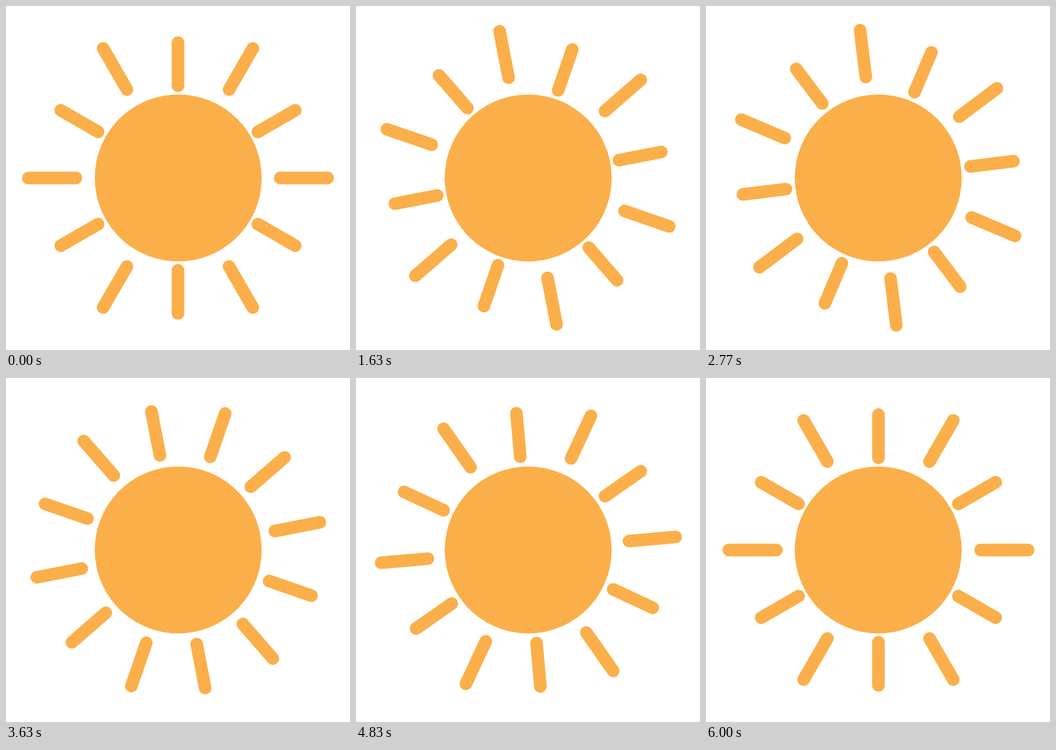
Write an HTML page that moves like this. It is 748 px wide and 748 px high and loops after 6030 ms.

```html
<!DOCTYPE html>
<html lang="en">
<head>
<meta charset="utf-8">
<title>Sun</title>
<style>
  html, body { margin: 0; width: 100%; height: 100%; overflow: hidden; background: #fff; }
  svg { display: block; width: 100vw; height: 100vh; }
</style>
</head>
<body>
<svg viewBox="0 0 748 748">
  <circle cx="374.5" cy="373.9" r="181.5" fill="#fbaf4a"/>
  <g id="rays" stroke="#fbaf4a" stroke-width="27.4" stroke-linecap="round"></g>
</svg>
<script>
  const LOOP = 6030;
  const FPS = 30;
  const LAST = 180;
  const HALF_PULSE = 45;
  const INNER = { mid: 211.45, swing: 10.75 };
  const OUTER = { mid: 309.8, swing: 15.5 };

  const group = document.getElementById('rays');
  const rays = Array.from({ length: 12 }, (_, i) => {
    const line = document.createElementNS('http://www.w3.org/2000/svg', 'line');
    line.setAttribute('transform', `rotate(${i * 30})`);
    return group.appendChild(line);
  });

  // Eased swing between 1 and -1, one way per HALF_PULSE steps
  function pulse(step) {
    const p = (step % HALF_PULSE) / HALF_PULSE;
    const value = 1 - 2 * p * p * (3 - 2 * p);
    return Math.floor(step / HALF_PULSE) % 2 ? -value : value;
  }

  function stepAt(ms) {
    const tick = Math.floor((ms % LOOP) / 10) * 10;
    return Math.min(LAST, Math.floor((tick + 4) * FPS / 1000));
  }

  function draw(step) {
    const swing = pulse(step);
    // One degree per step, around a point half a pixel off the rays' centre
    group.setAttribute('transform', `translate(374.5 374) rotate(${step}) translate(-0.5 0)`);
    rays.forEach((ray, i) => {
      const s = i % 2 ? swing : -swing;
      ray.setAttribute('y1', -(INNER.mid + INNER.swing * s));
      ray.setAttribute('y2', -(OUTER.mid + OUTER.swing * s));
    });
  }

  function frame() {
    draw(stepAt(performance.now()));
    requestAnimationFrame(frame);
  }
  frame();
</script>
</body>
</html>
```
